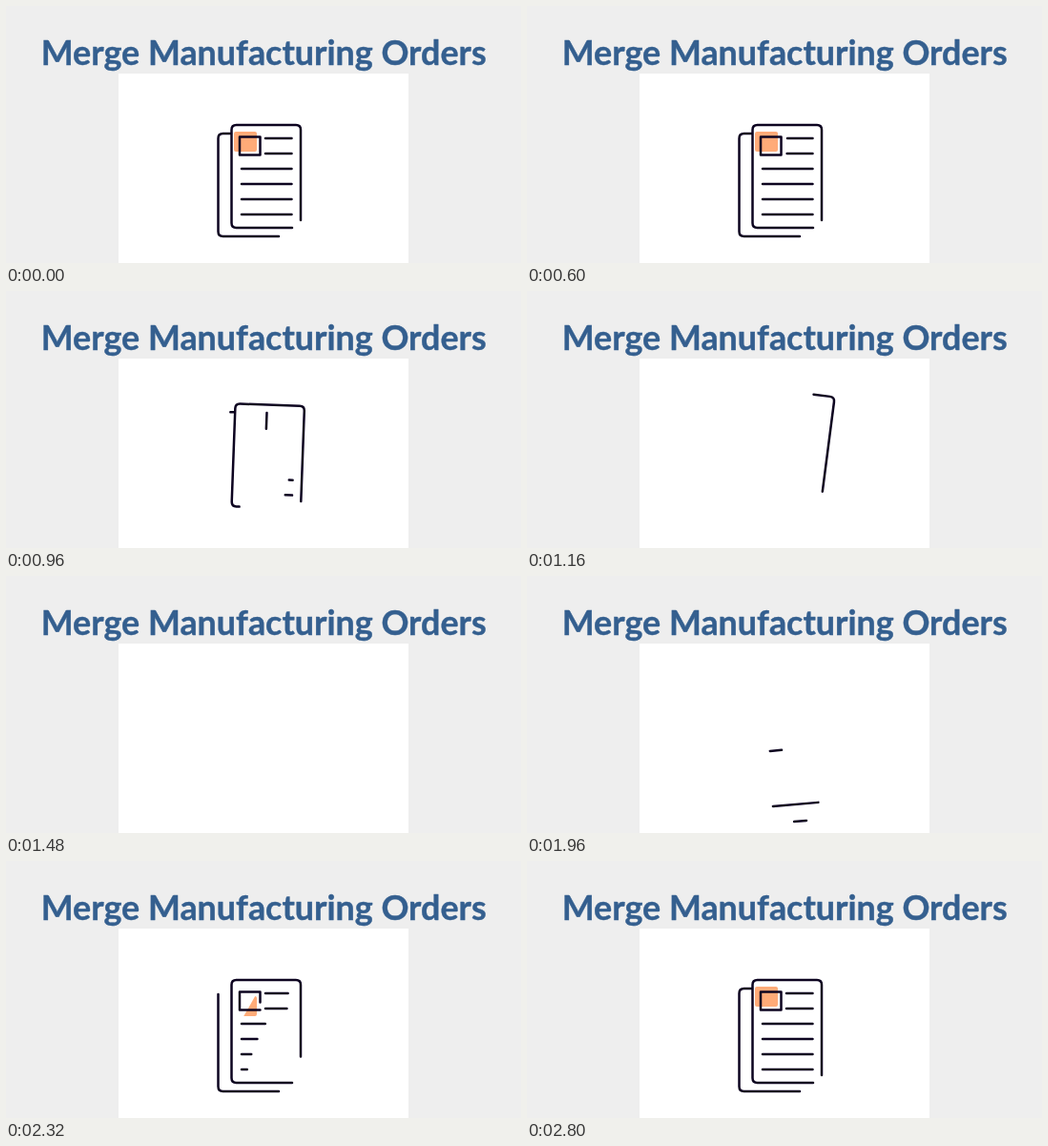
An HTML page that plays this animation: 540 by 270 pixels, repeating every 2840 ms.

```html
<!DOCTYPE html>
<html lang="en">
<head>
<meta charset="utf-8">
<title>Merge Manufacturing Orders</title>
<style>
  html, body { margin: 0; width: 100%; height: 100%; overflow: hidden; background: #eee; }
  svg { display: block; width: 540px; height: 270px; }
  text { font: 700 35.9px Lato, Carlito, sans-serif; fill: #345f8f; stroke: #345f8f; stroke-width: .4; text-anchor: middle; }
  .ink { fill: none; stroke: #0d0420; stroke-width: 2.5; stroke-linecap: round; stroke-linejoin: round; }
</style>
</head>
<body>
<svg viewBox="0 0 540 270">
  <defs>
    <clipPath id="tile"><rect x="239" y="132" width="24" height="21" rx="2"/></clipPath>
  </defs>
  <rect width="540" height="270" fill="#eee"/>
  <rect x="118" y="71" width="304" height="199" fill="#fff"/>
  <text x="270.2" y="62">Merge Manufacturing Orders</text>
  <g id="sheets">
    <g id="orange"><g clip-path="url(#tile)"><polygon id="wipe" fill="#ffab78"/></g></g>
    <g id="lines"></g>
  </g>
</svg>
<script>
const LOOP = 2840, SWITCH = 1500, LINE_TIME = 430;
const $ = id => document.getElementById(id);

// Symmetric ease-in-out from 0 to 1
function ease(t, start, duration, power = 3) {
  const x = Math.min(1, Math.max(0, (t - start) / duration));
  const half = y => (2 * y) ** power / 2;
  return x < .5 ? half(x) : 1 - half(1 - x);
}

const move = (el, x, y, turn = 0) =>
  el.setAttribute("transform", `translate(${x} ${y}) rotate(${turn} 272 187)`);

// leave and enter are [start, duration]; away and below are offsets at the far ends
const parts = [];
function addPart(d, leave, enter, away = [0, 0], below = 0) {
  const el = document.createElementNS("http://www.w3.org/2000/svg", "path");
  el.setAttribute("d", d);
  el.setAttribute("class", "ink");
  $("lines").append(el);
  parts.push({ el, leave, enter, away, below, length: el.getTotalLength() });
}

const BOX_AWAY = [16, -31], FRONT_BELOW = -10.4, BOX_BELOW = 11;

// Back sheet, front sheet, small box
addPart("M286 242H227.500Q222.500 242 222.500 237V139Q222.500 134 227.500 134H236", [606, 437], [1751, 804]);
addPart("M300 233H241.500Q236.500 233 236.500 228V130Q236.500 125 241.500 125H304Q309 125 309 130V225",
  [630, 960], [1684, 845], [0, 0], FRONT_BELOW);
addPart("M266.500 156.500H245V137.500H266.500Z", [638, 515], [1637, 965], BOX_AWAY, BOX_BELOW);

// Text lines, one after another from the top
for (let i = 0; i < 6; i++) {
  const short = i < 2;
  const start = short ? 512 + 13 * i : 536 + 27 * i;
  addPart(`M${short ? 272 : 247} ${139 + 16 * i}H299.500`,
    [start, LINE_TIME], [start + 1520, LINE_TIME], [0, 0], FRONT_BELOW);
}

function render(t) {
  const leaving = t < SWITCH;
  const far = leaving ? ease(t, 480, 1200, 4) : 1 - ease(t, 1718, 669, 4);

  // Leave up and to the right, return from below
  if (leaving) move($("sheets"), 8.3 * far, -26 * far, 10.2 * far);
  else move($("sheets"), 2.7 * far, 19 * far, -5.7 * far);

  for (const p of parts) {
    const from = leaving ? ease(t, ...p.leave) : 0;
    const to = leaving ? 1 : ease(t, ...p.enter);
    const size = (to - from) * p.length;
    p.el.style.visibility = size > (leaving ? 2.3 : .2) ? "visible" : "hidden";
    p.el.style.strokeDasharray = to - from > .9999 ? "none" : `${size} ${p.length * 2}`;
    p.el.style.strokeDashoffset = -from * p.length;
    if (leaving) move(p.el, p.away[0] * far, p.away[1] * far);
    else move(p.el, 0, p.below * far);
  }

  // A slanted edge crosses the orange tile from right to left
  const wiped = ease(t, leaving ? 585 : 2126, LINE_TIME);
  const edge = 275 - 37 * wiped, side = leaving ? 200 : 300;
  $("wipe").setAttribute("points", `${side},132 ${edge},132 ${edge - 12},153 ${side},153`);
  if (leaving) move($("orange"), BOX_AWAY[0] * far, BOX_AWAY[1] * far);
  else move($("orange"), 0, 16 * (1 - wiped));
}

const begin = performance.now();
function tick() {
  render((performance.now() - begin) % LOOP);
  requestAnimationFrame(tick);
}
tick();
</script>
</body>
</html>
```
